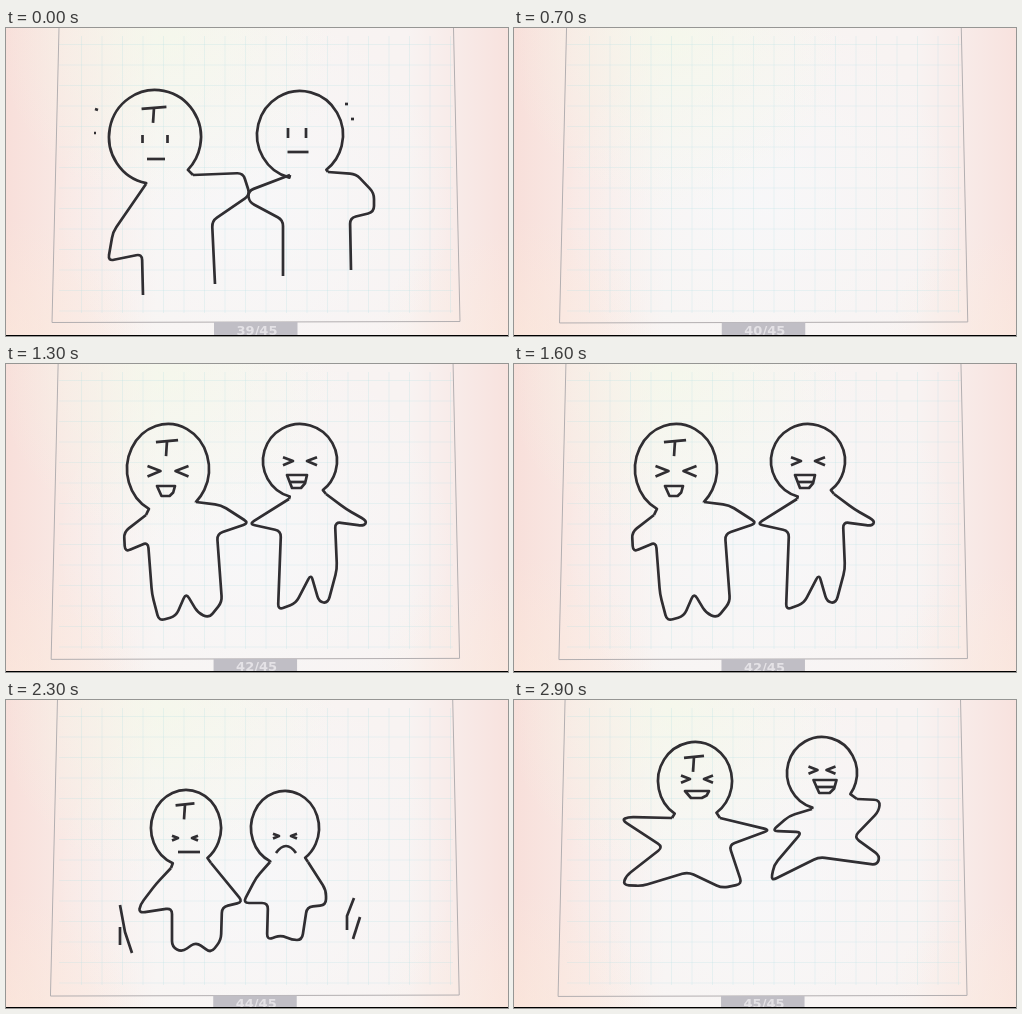
Recreate the animation shown at these times as an HTML page with a canvas. Size 502 by 308 pixels, loop 3 s.

```html
<!DOCTYPE html>
<html lang="en">
<head>
<meta charset="utf-8">
<title>Flipbook friends</title>
<style>
html, body { margin: 0; width: 100%; height: 100%; overflow: hidden; background: #f8efec; }
canvas { display: block; }
</style>
</head>
<body>
<canvas id="stage" width="502" height="308"></canvas>
<script>
const W = 502, H = 308, LOOP = 3000, FIRST_PAGE = 39, PAGES = 45;
const ctx = document.getElementById('stage').getContext('2d');

// Key points of a body, from the right side of the neck round to the left side.
const outline = text => text.split(' / ').map(
  stroke => stroke.split(' ').map(point => point.split(',').map(Number)));

const bodies = {
  bust: [
    outline('187,147 237,145 244,167 206,193 209,256 / 137,267 136,226 102,233 107,204 140,156'),
    outline('322,144 350,146 368,165 368,184 344,190 345,242 / 277,248 277,192 243,174 242,163 284,147')
  ],
  standing: [
    outline('190,138 215,141 243,159 211,170 216,238 203,254 192,249 180,229 170,252 153,257 146,230 142,178 119,188 118,168 140,151'),
    outline('320,130 340,145 361,157 358,162 329,158 331,205 322,239 313,238 305,210 290,239 272,246 275,167 243,160 283,135')
  ],
  stamping: [
    outline('205,163 237,202 216,207 215,240 205,253 190,242 176,252 166,247 166,208 133,213 134,205 150,184 165,168'),
    outline('302,162 320,190 320,205 301,207 296,240 286,240 275,235 261,240 262,203 237,203 250,178 264,162')
  ],
  jumping: [
    outline('206,118 256,130 215,145 228,184 208,188 174,172 128,186 109,185 112,176 149,147 108,120 114,117 158,118'),
    outline('343,99 366,100 365,111 340,137 366,156 363,165 305,157 257,181 260,165 288,132 258,131 275,116 298,109')
  ]
};

// head: x, y, rx, ry; eyes: x, y, gap, size; mouth: x, y, width, depth
const person = (head, eyes, mouth) => ({ head, eyes, mouth });

const pages = [
  { body: 'bust', people: [
    person([149, 109, 46, 47], [149, 111, 25, 8], [150, 131, 18, 0]),
    person([294, 107, 43, 44], [291, 105, 18, 10], [292, 124, 21, 0])],
    marks: outline('89,81 92,82 / 88,105 90,105 / 339,76 342,76 / 345,91 348,91') },
  { people: [] },
  { body: 'bust', squint: true, laugh: true, people: [
    person([149, 106, 46, 48], [148, 114, 25, 17], [150, 128, 22, 9]),
    person([295, 104, 39, 39], [291, 101, 19, 11], [289, 114, 26, 18])] },
  { body: 'standing', squint: true, laugh: true, people: [
    person([162, 105, 41, 45], [162, 107, 28, 13], [160, 122, 18, 10]),
    person([294, 97, 37, 37], [294, 97, 24, 10], [291, 111, 20, 13])] },
  { body: 'standing', people: [
    person([167, 107, 41, 44], [167, 110, 27, 9], [168, 126, 27, 11]),
    person([293, 98, 38, 37], [290, 99, 18, 10], [291, 117, 20, 4])] },
  { body: 'stamping', squint: true, people: [
    person([180, 128, 35, 38], [179, 138, 20, 6], [183, 152, 22, 0]),
    person([279, 128, 34, 37], [279, 136, 18, 6], [280, 153, 20, -7])],
    marks: outline('114,227 114,245 / 114,205 119,232 126,253 / 348,198 341,216 341,230 / 354,217 347,239') },
  { body: 'jumping', squint: true, laugh: true, people: [
    person([181, 81, 37, 39], [183, 79, 23, 9], [183, 91, 24, 7]),
    person([308, 73, 35, 36], [308, 70, 18, 9], [311, 80, 23, 13])] }
];

function line(...points) {
  ctx.beginPath();
  points.forEach(([x, y]) => ctx.lineTo(x, y));
  ctx.stroke();
}

// Polyline with softened corners.
function pen(points, radius = 6) {
  const toward = ([x, y], [u, v]) => {
    const k = Math.min(0.5, radius / Math.hypot(u - x, v - y));
    return [x + (u - x) * k, y + (v - y) * k];
  };
  ctx.beginPath();
  ctx.moveTo(...points[0]);
  for (let i = 1; i < points.length - 1; i++) {
    ctx.lineTo(...toward(points[i], points[i - 1]));
    ctx.quadraticCurveTo(...points[i], ...toward(points[i], points[i + 1]));
  }
  ctx.lineTo(...points.at(-1));
  ctx.stroke();
}

function drawHead([x, y, rx, ry], neckLeft, neckRight) {
  const angle = ([u, v]) => Math.atan2((v - y) / ry, (u - x) / rx);
  ctx.beginPath();
  ctx.moveTo(...neckLeft);
  ctx.ellipse(x, y, rx, ry, 0, angle(neckLeft), angle(neckRight));
  ctx.lineTo(...neckRight);
  ctx.stroke();
}

function drawHair([x, y, rx, ry]) {
  const top = y - ry * 0.62, half = rx * 0.27;
  line([x - 1 - half, top + 1], [x - 1 + half, top - 1]);
  line([x - 1, top], [x - 2, top + 15]);
}

function drawEyes([x, y, gap, size], squint) {
  for (const side of [-1, 1]) {
    const ex = x + side * gap / 2;
    if (squint) {
      const outer = ex + side * size / 2, inner = ex - side * size / 2;
      line([outer, y - size * 0.38], [inner, y], [outer, y + size * 0.42]);
    } else {
      line([ex, y - size / 2], [ex, y + size / 2]);
    }
  }
}

function drawMouth([x, y, width, depth], laugh) {
  const half = width / 2;
  ctx.beginPath();
  ctx.moveTo(x - half, y);
  if (laugh) {
    ctx.lineTo(x + half, y);
    ctx.lineTo(x + half * 0.8, y + depth * 0.65);
    ctx.lineTo(x + half * 0.4, y + depth);
    ctx.lineTo(x - half * 0.5, y + depth);
    ctx.closePath();
  } else {
    ctx.quadraticCurveTo(x, y + depth * 2, x + half, y);
  }
  ctx.stroke();
  if (laugh && depth > 10) line([x - half * 0.8, y + 7], [x + half * 0.8, y + 7]);
}

function drawPage({ body, people, squint, laugh, marks = [] }) {
  ctx.strokeStyle = '#302e32';
  ctx.lineWidth = 2.7;
  ctx.lineJoin = 'round';
  people.forEach(({ head, eyes, mouth }, i) => {
    const strokes = bodies[body][i];
    strokes.forEach(stroke => pen(stroke));
    drawHead(head, strokes.at(-1).at(-1), strokes[0][0]);
    if (i === 0) drawHair(head);
    drawEyes(eyes, squint);
    drawMouth(mouth, laugh);
  });
  marks.forEach(mark => line(...mark));
}

function glow(x, y, r, rgb, alpha) {
  const g = ctx.createRadialGradient(x, y, 0, x, y, r);
  g.addColorStop(0, `rgba(${rgb},${alpha})`);
  g.addColorStop(1, `rgba(${rgb},0)`);
  ctx.fillStyle = g;
  ctx.fillRect(0, 0, W, H);
}

function drawPaper() {
  const g = ctx.createLinearGradient(0, 0, W, 0);
  g.addColorStop(0, '#f8dfda');
  g.addColorStop(0.12, '#f9e9e5');
  g.addColorStop(0.3, '#f8f4f2');
  g.addColorStop(0.8, '#f8f3f2');
  g.addColorStop(1, '#f8e2de');
  ctx.fillStyle = g;
  ctx.fillRect(0, 0, W, H);
  glow(250, 180, 200, '247,248,250', 0.8);
  glow(160, 10, 170, '243,249,232', 0.6);
  glow(10, 320, 130, '252,235,220', 0.5);
  glow(490, 320, 120, '252,235,222', 0.5);
  ctx.lineWidth = 1;
  ctx.strokeStyle = 'rgba(175,222,226,.24)';
  for (let x = 75.5; x < 445; x += 20.5) line([x, 8], [x, 285]);
  for (let y = 16.5; y < 290; y += 20.5) line([53, y], [447, y]);
}

function drawScreen(page, drift) {
  const left = -2 * drift, right = -drift, bottom = 294.5 + 2 * drift;
  ctx.strokeStyle = '#b3afb1';
  line([53 + left, 0], [46 + left, bottom], [454 + right, bottom - 1], [447.5 + right, 0]);
  ctx.fillStyle = '#c0bec5';
  ctx.fillRect(208 + right, bottom - 0.5, 83.5, 14);
  ctx.fillStyle = '#e4e2e6';
  ctx.font = 'bold 13px "DejaVu Sans", sans-serif';
  ctx.textAlign = 'center';
  ctx.fillText(`${FIRST_PAGE + page}/${PAGES}`, 251 + right, bottom + 12);
  ctx.fillStyle = '#000';
  ctx.fillRect(0, H - 1, W, 1);
}

function tick() {
  const time = Math.floor(performance.now() % LOOP / 100) * 100;
  const progress = time / LOOP;
  const page = Math.floor(progress * pages.length);
  drawPaper();
  drawScreen(page, progress);
  drawPage(pages[page]);
  requestAnimationFrame(tick);
}
tick();
</script>
</body>
</html>
```
